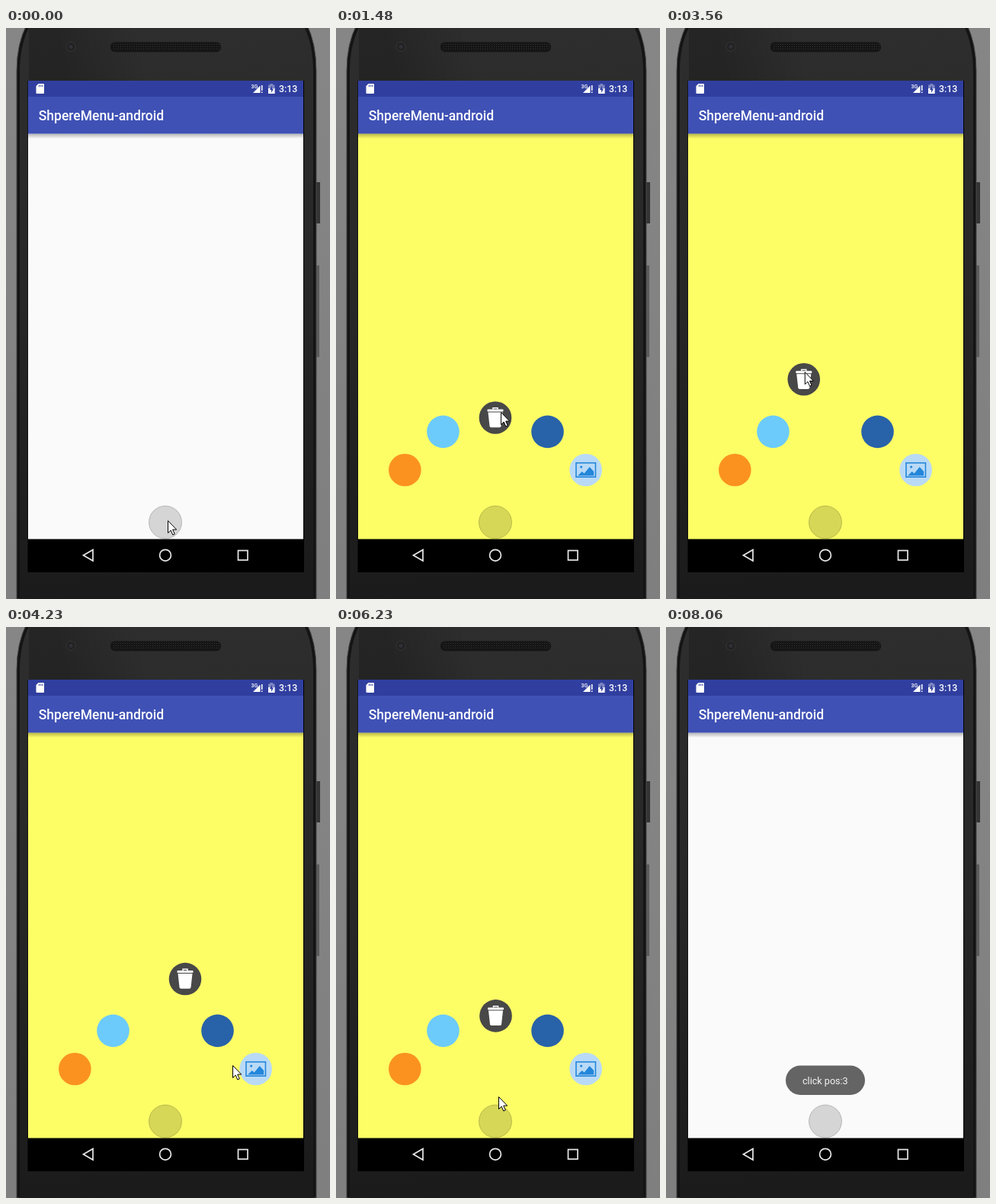
Write an HTML page with a canvas that moves like this. It is 425 px wide and 748 px high and loops after 8680 ms.

```html
<!DOCTYPE html>
<html lang="en">
<head>
<meta charset="utf-8">
<title>Sphere menu</title>
<style>
html, body { margin: 0; width: 100%; height: 100%; overflow: hidden; background: #828282; }
canvas { display: block; }
</style>
</head>
<body>
<canvas id="stage" width="425" height="748"></canvas>
<script>
const ctx = document.getElementById('stage').getContext('2d');
const LOOP = 8680;
const STEP = 135;
const HUB = { x: 209, y: 647.5 };
const RADIUS = 137;
const ITEM_R = 21.3;
const COLORS = ['#fb9220', '#6ccbfa', '#484848', '#2862a8', '#b9daf6'];

// Pointer moves in order; those with a lift drag the middle item along an S-shaped arc.
const MOVES = [
  { at: 700, end: 1300, x: 216, y: 503 },
  { at: 1750, end: 2720, x: 207, y: 475, swing: 50, lift: 110 },
  { at: 3290, end: 3420, x: 210, y: 500 },
  { at: 3420, end: 4155, x: 265, y: 396, swing: 85, lift: 230 },
  { at: 4155, end: 4205, x: 297, y: 574 },
  { at: 4360, end: 4630, x: 210, y: 500 },
  { at: 4630, end: 5480, x: 310, y: 290, swing: 50, lift: 90 },
  { at: 5500, end: 6230, x: 213, y: 615 },
  { at: 6510, end: 6640, x: 212, y: 516 },
  { at: 7240, end: 7510, x: 215, y: 687 },
  { at: 7640, end: 7985, x: 240, y: 732 }
];

const ramp = (t, a, b) => Math.max(0, Math.min(1, (t - a) / (b - a)));
const ease = p => p * p * (3 - 2 * p);
const mix = (a, b, p) => a + (b - a) * p;

// The picture advances in even steps, like a screen recording.
const stepTime = t => Math.floor((t - 20) / STEP) * STEP + 20;

function pointerAt(t) {
  let x = 212, y = 645;
  for (const m of MOVES) {
    if (t <= m.at) break;
    const p = ease(ramp(t, m.at, m.end));
    x = mix(x, m.x, p) - (m.swing || 0) * Math.sin(2 * Math.PI * p);
    y = mix(y, m.y, p) - (m.lift || 0) * Math.sin(Math.PI * p);
  }
  return { x, y };
}

function homeOf(i) {
  const angle = (150 - 30 * i) * Math.PI / 180;
  return { x: HUB.x + RADIUS * Math.cos(angle), y: HUB.y - RADIUS * Math.sin(angle) };
}

// The middle item follows the pointer while dragged, then springs home.
function draggedItem(t) {
  const home = homeOf(2);
  const drag = MOVES.filter(m => m.lift && t >= m.at).pop();
  if (!drag) return home;
  const tip = pointerAt(Math.min(t, drag.end));
  const s = Math.max(0, t - drag.end) / 1000;
  const k = Math.exp(-7 * s) * Math.cos(16.7 * s);
  return { x: mix(home.x, tip.x - 1, k), y: mix(home.y, tip.y + 10, k) };
}

function openness(t) {
  if (t > 6700) return 1 - ramp(t, 6720, 7130) ** 2;
  const p = ramp(t, 650, 1250) - 1;
  return 1 + 2.2 * p ** 3 + 1.2 * p ** 2;
}

function rect(x, y, w, h, fill) {
  ctx.fillStyle = fill;
  ctx.fillRect(x, y, w, h);
}

function round(x, y, w, h, r, fill) {
  ctx.beginPath();
  ctx.roundRect(x, y, w, h, r);
  ctx.fillStyle = fill;
  ctx.fill();
}

function disc(x, y, r, fill, stroke) {
  ctx.beginPath();
  ctx.arc(x, y, r, 0, 7);
  if (fill) { ctx.fillStyle = fill; ctx.fill(); }
  if (stroke) { ctx.strokeStyle = stroke; ctx.stroke(); }
}

function shape(d, fill, stroke) {
  const path = new Path2D(d);
  if (fill) { ctx.fillStyle = fill; ctx.fill(path); }
  if (stroke) { ctx.strokeStyle = stroke; ctx.stroke(path); }
}

function text(str, x, y, font, fill = '#fff') {
  ctx.font = font + ' Roboto, sans-serif';
  ctx.fillStyle = fill;
  ctx.fillText(str, x, y);
}

function gradient(x0, y0, x1, y1, ...stops) {
  const g = ctx.createLinearGradient(x0, y0, x1, y1);
  stops.forEach((c, i) => g.addColorStop(i / (stops.length - 1), c));
  return g;
}

function drawPhone() {
  rect(0, 0, 425, 748, gradient(0, 0, 0, 748, '#868686', '#7f7f7f'));
  rect(407, 202, 5, 54, '#343434');
  rect(407, 311, 4, 120, '#5c5c5c');
  ctx.lineWidth = 1;
  shape('M14 748V56Q14 20 28 -6H394Q407 20 407 56V748Z', '#141414', '#4a4a4a');
  shape('M18 748V58Q18 20 33 -6H389Q403 20 403 58V748Z',
    gradient(0, 0, 60, 748, '#2e2e2e', '#272727', '#1b1b1b'));
  rect(30, 0, 150, 69, gradient(70, 30, 170, 0, 'rgba(0,0,0,.2)', 'rgba(0,0,0,0)'));
  disc(85, 24.5, 6, '#222', '#363636');
  disc(85, 24.5, 2.5, '#303038');
  round(137, 18.5, 145, 13, 6, '#151515');
  for (let x = 141; x < 280; x += 3)
    for (let y = 21; y < 30; y += 3) rect(x, y, 1, 1, '#343434');
  rect(28.5, 69, 362.5, 644, '#000');
}

function drawBars() {
  rect(29, 138.5, 361, 7, gradient(0, 138, 0, 145, 'rgba(0,0,0,.3)', 'rgba(0,0,0,0)'));
  rect(29, 69, 361, 21, '#303f9f');
  rect(29, 90, 361, 48.5, '#3f51b5');
  text('ShpereMenu-android', 42.7, 121, '500 17.56px');
  text('3:13', 358, 84, '500 12.3px');
  shape('M42.5 73H49Q50 73 50 74V85Q50 86 49 86H40.5Q39.5 86 39.5 85V76Z', '#fff');
  for (let x = 43; x < 48; x += 2.2) rect(x, 74.5, 1, 2.5, '#303f9f');
  text('3G', 321.5, 78.5, '500 7px');
  shape('M324 85L333.5 75.5V85Z', '#fff');
  rect(335, 75, 1.5, 7, '#fff');
  rect(335, 83.5, 1.5, 1.5, '#fff');
  shape('M346.5 73H350V74.5H352.5V86H344V74.5H346.5Z', '#7f88c4');
  rect(344, 79, 8.5, 7, '#fff');
  shape('M349 75.5L345.8 81H348V85L351 79.5H349Z', '#303f9f');
}

function drawNav() {
  rect(29, 669.5, 362, 43.5, '#000');
  ctx.lineWidth = 1.7;
  shape('M101.5 690.7L114 683.5V698Z', null, '#e8e8e8');
  disc(209, 690.7, 7.4, null, '#e8e8e8');
  ctx.strokeRect(304.5, 684.5, 12.5, 12.5);
}

function drawItem(i, x, y) {
  ctx.save();
  ctx.translate(x, y);
  disc(0, 0, ITEM_R, COLORS[i]);
  if (i === 2) {
    round(-10.5, -11, 21, 3, 1, '#fff');
    ctx.lineWidth = 1.5;
    shape('M-3 -11V-12.7H3V-11', null, '#fff');
    shape('M-9.5 -7H9.5L7.5 11Q7.2 12.7 5.5 12.7H-5.5Q-7.2 12.7 -7.5 11Z', '#fff');
  }
  if (i === 4) {
    ctx.lineWidth = 1.6;
    ctx.strokeStyle = '#2386da';
    ctx.strokeRect(-12.7, -9.3, 25.5, 18.5);
    shape('M-10.5 7.5L-5 2L-2 4.5L5 -4L10.5 2V7.5Z', '#2386da');
    disc(-6, -4, 1.6, '#2386da');
  }
  ctx.restore();
}

function drawMenu(t) {
  const open = openness(t);
  if (open <= 0.01) return;
  ctx.globalAlpha = Math.min(1, open * 3);
  for (const i of [0, 1, 3, 4, 2]) {
    const to = i === 2 ? draggedItem(t) : homeOf(i);
    drawItem(i, mix(HUB.x, to.x, open), mix(HUB.y, to.y, open));
  }
  ctx.globalAlpha = 1;
}

function drawToast(t) {
  ctx.globalAlpha = ramp(t, 7025, 7275);
  round(157, 574.5, 104, 38.5, 19.25, '#646464');
  text('click pos:3', 179, 598.5, '12.6px', '#f4f4f4');
  ctx.globalAlpha = 1;
}

function drawPointer(t) {
  const { x, y } = pointerAt(t);
  ctx.save();
  ctx.translate(x + 0.5, y + 0.5);
  ctx.lineWidth = 1;
  shape('M0 0V16L3.7 12.6L6.3 18.5L8.8 17.4L6.2 11.6H11.2Z', '#fff', '#000');
  ctx.restore();
}

function draw(t) {
  drawPhone();
  rect(29, 138, 361, 532, '#fafafa');
  ctx.globalAlpha = ramp(t, 650, 1150) - ramp(t, 6840, 7300);
  rect(29, 138, 361, 532, '#fdfd66');
  ctx.globalAlpha = 1;
  drawBars();
  drawMenu(t);
  ctx.lineWidth = 1;
  disc(HUB.x, HUB.y, 21.5, 'rgba(0,0,0,.15)', 'rgba(0,0,0,.2)');
  drawToast(t);
  drawNav();
  if (t > 400 && t < 690) disc(211, 644.5, 10, 'rgba(0,0,0,.12)');
  if (t < 7985) drawPointer(t);
}

const start = performance.now();
function tick() {
  draw(stepTime((performance.now() - start) % LOOP));
  requestAnimationFrame(tick);
}
tick();
</script>
</body>
</html>
```
